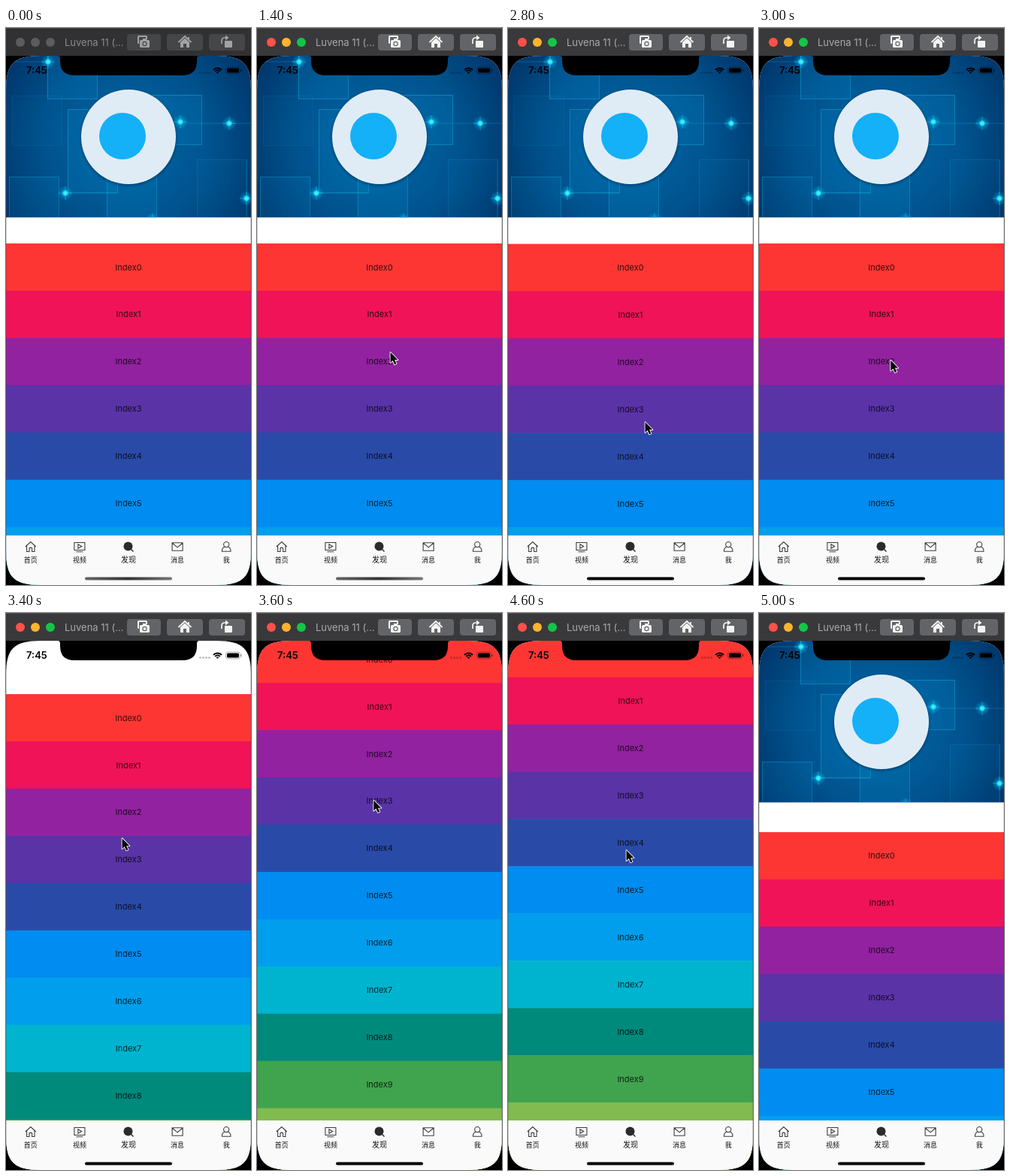
An HTML page with a canvas for the animation above (5.2 s loop, 326 by 742 pixels).

```html
<!DOCTYPE html>
<html lang="zh">
<head>
<meta charset="utf-8">
<title>Scrolling list</title>
<style>
html, body { margin: 0; width: 100%; height: 100%; overflow: hidden; background: #000; }
canvas { display: block; width: 326px; height: 742px; }
</style>
</head>
<body>
<canvas id="stage"></canvas>
<script>
const W = 326, H = 742, LOOP = 5200, STEP = 200;
const TOP = 37, ROW = 62.95, REST = 287, TAB_Y = 676, BANNER_H = 215.6;
const COLORS = ['#fd3633', '#f01358', '#9222a0', '#5a33a6', '#2a4aa8', '#008cf0', '#009eec',
  '#00b4cf', '#008a7c', '#40a44e', '#82bb50', '#cdd648', '#ffe23a'];

const canvas = document.getElementById('stage');
const dpr = window.devicePixelRatio || 1;
canvas.width = W * dpr;
canvas.height = H * dpr;
const c = canvas.getContext('2d');
c.scale(dpr, dpr);

const clamp = v => Math.max(0, Math.min(1, v));
const part = (t, a, b) => clamp((t - a) / (b - a));
const easeOut = (t, a, b) => Math.sin(part(t, a, b) * Math.PI / 2);
const hump = (t, a, b) => Math.sin(part(t, a, b) * Math.PI);
function ramp(t, a, b) {
  const u = part(t, a, b);
  return u * u * (3 - 2 * u);
}

// Top of the first row: short drag, overscroll and release, long swipe up and back.
function listTop(t) {
  return REST - 137 * hump(t, 400, 1200)
    + 67 * (ramp(t, 1400, 2200) - ramp(t, 2300, 2830))
    - 408 * (easeOut(t, 3000, 4384) - ramp(t, 4400, 4900))
    + 8 * hump(t, 4700, 5080);
}

function pointerAt(t) {
  return [
    177 + 5 * ramp(t, 1400, 2800) - 28 * ramp(t, 2800, 3400) + 3 * ramp(t, 3400, 4000),
    431 - 137 * hump(t, 400, 1200) + 137 * ramp(t, 1400, 2200) - 44 * ramp(t, 2300, 2800)
      - 318 * easeOut(t, 2800, 4000) + 310 * ramp(t, 4400, 4900)
  ];
}

function rect(x, y, w, h, color) {
  c.fillStyle = color;
  c.fillRect(x, y, w, h);
}

function round(x, y, w, h, r, color) {
  c.beginPath();
  c.roundRect(x, y, w, h, r);
  c.fillStyle = color;
  c.fill();
}

function disc(x, y, r, color) {
  c.beginPath();
  c.arc(x, y, r, 0, 7);
  c.fillStyle = color;
  c.fill();
}

function path(d, color, width) {
  const p = new Path2D(d);
  if (width) {
    c.strokeStyle = color;
    c.lineWidth = width;
    c.stroke(p);
  } else {
    c.fillStyle = color;
    c.fill(p);
  }
}

function text(s, x, y, font, color, align = 'center') {
  c.font = font;
  c.fillStyle = color;
  c.textAlign = align;
  c.fillText(s, x, y);
}

function place(x, y, draw) {
  c.save();
  c.translate(x, y);
  draw();
  c.restore();
}

function titleBar(active) {
  rect(0, 0, W, TOP, active ? '#39393b' : '#313133');
  rect(0, 0, W, 1, active ? '#525254' : '#414143');
  ['#ff5049', '#fdb42f', '#12c648'].forEach((color, i) =>
    disc(19 + i * 20, 19, 6, active ? color : '#5c5c5f'));
  text('Luvena 11 (...', 78, 24, '13px Inter, sans-serif', active ? '#a9a9ae' : '#8b8b8f', 'left');

  const face = active ? '#636467' : '#454648';
  const ink = active ? '#f4f4f4' : '#a2a2a4';
  round(161, 8, 45, 22, 4, face);
  round(214, 8, 48, 22, 4, face);
  round(270, 8, 48, 22, 4, face);
  place(183, 19, () => {
    round(-8, -9, 13, 11, 1.5, ink);
    rect(-6, -7, 9, 7, face);
    round(-6, -4, 15, 12, 2, face);
    round(-5, -3, 13, 10, 1.5, ink);
    rect(-1, -5, 5, 3, ink);
    disc(1.5, 2, 3.2, face);
    disc(1.5, 2, 2, ink);
  });
  place(238, 19, () => {
    path('M-8.5 0L0-8L8.5 0M5-7V-3', ink, 1.8);
    path('M-6 0L0-5.5L6 0V7H2V2H-2V7H-6Z', ink);
  });
  place(294, 19, () => {
    round(-3, -2, 10, 9, 1, ink);
    path('M-7 2V-2Q-7-6-3-6H-1', ink, 1.7);
    path('M-2-9.5L2.5-6L-2-2.5Z', ink);
  });
}

function glow(x, y) {
  const g = c.createRadialGradient(x, y, 0, x, y, 10);
  g.addColorStop(0, '#7dfaff');
  g.addColorStop(0.28, '#16dcf2');
  g.addColorStop(0.45, 'rgba(0,190,240,.4)');
  g.addColorStop(1, 'rgba(0,170,240,0)');
  disc(x, y, 10, g);
  path(`M${x - 9} ${y}h18M${x} ${y - 9}v18`, 'rgba(60,225,250,.4)', 1);
}

function panel(x, y, h, strength) {
  rect(x, y, 66, h, `rgba(0,160,225,${strength * 0.3})`);
  c.strokeStyle = `rgba(20,180,225,${strength})`;
  c.lineWidth = 1;
  c.strokeRect(x + 0.5, y + 0.5, 66, h);
}

function banner() {
  c.beginPath();
  c.rect(0, TOP, W, BANNER_H);
  c.clip();
  const g = c.createRadialGradient(163, 155, 20, 163, 150, 205);
  g.addColorStop(0, '#0064a3');
  g.addColorStop(0.5, '#00528d');
  g.addColorStop(1, '#003064');
  rect(0, TOP, W, BANNER_H, g);

  panel(55, 28, 66, 0.45);
  panel(82, 108, 111, 0.4);
  panel(194, 89, 66, 0.45);
  panel(4, 198, 66, 0.35);
  panel(134, 192, 66, 0.4);
  panel(254, 175, 80, 0.15);
  panel(8, 90, 66, 0.1);
  path('M0 45H56M226 127H326M79 220H148M320 175V252', 'rgba(20,180,225,.3)', 1);
  glow(56, 45);
  glow(232, 125);
  glow(297, 127);
  glow(79, 220);
  glow(320, 227);
  glow(195, 256);

  c.shadowColor = 'rgba(0,25,60,.6)';
  c.shadowBlur = 4 * dpr;
  c.shadowOffsetY = 1.5 * dpr;
  disc(163, 145, 63, '#e0ecf5');
  c.shadowColor = 'transparent';
  disc(155, 144, 31, '#14b0f8');
}

// The banner scrolls at a quarter of the list speed and fades near the end.
function header(top) {
  const range = REST - TOP - 79;
  const t = clamp((REST - top) / range);
  const alpha = clamp((1 - t) / 0.26);
  if (!alpha) return;
  c.save();
  c.beginPath();
  c.rect(0, TOP, W, top - TOP);
  c.clip();
  c.globalAlpha = alpha;
  c.translate(0, -range / 4 * t);
  banner();
  c.restore();
}

function list(top) {
  COLORS.forEach((color, i) => {
    const y = top + i * ROW;
    rect(0, y, W, ROW + 0.5, color);
    text('Index' + i, 163, y + 35.5, '11px Inter, sans-serif', 'rgba(0,0,0,.78)');
  });
}

function statusBar() {
  text('7:45', 27, 61, '600 13px Inter, sans-serif', '#000', 'left');
  for (let i = 0; i < 4; i++) disc(258.5 + i * 4, 59.5, 1.5, 'rgba(0,0,0,.24)');
  for (let r = 1.5; r < 8; r += 3) {
    c.beginPath();
    c.arc(281.5, 61, r, -Math.PI * 0.76, -Math.PI * 0.24);
    c.strokeStyle = '#000';
    c.lineWidth = 2;
    c.stroke();
  }
  c.beginPath();
  c.roundRect(292.5, 52, 19, 9, 2.8);
  c.strokeStyle = 'rgba(0,0,0,.4)';
  c.lineWidth = 0.8;
  c.stroke();
  round(294, 53.4, 16, 6.2, 1.6, '#000');
  round(312.5, 55, 1.2, 3, 0.6, 'rgba(0,0,0,.45)');
}

const INK = '#3c3c3c';
const TABS = [
  ['首页', () => path('M-7 0L0-6.5L7 0M-5.2-1.5V6.5H-1.8V2Q0 .2 1.8 2V6.5H5.2V-1.5', INK, 1.1)],
  ['视频', () => path('M-7-5.5H7V4.5H-7ZM-4.5 6.8H4.5M-2-3.3L2.8-.5L-2 2.3Z', INK, 1.1)],
  ['发现', () => {
    disc(-0.5, -0.5, 6, '#2b2b2d');
    path('M3 3L6.5 6.5', '#2b2b2d', 1.4);
  }],
  ['消息', () => path('M-7-5.3H7V5.3H-7ZM-7-5L0 .8L7-5', INK, 1.1)],
  ['我', () => path('M0-6.5A3.6 3.6 0 0 1 0 .7A3.6 3.6 0 0 1 0-6.5ZM-2.4 0Q-6 1.8-5.8 6.3H5.8Q6 1.8 2.4 0', INK, 1.1)]
];

function tabBar(t) {
  rect(0, TAB_Y, W, H - TAB_Y, '#fafafa');
  TABS.forEach(([label, icon], i) => {
    const x = 32.8 + i * 65.1;
    place(x, 691, icon);
    const size = i === 2 ? 10 : 9;
    text(label, x, 712.3, size + 'px "Noto Sans CJK SC", "Noto Sans CJK", sans-serif', '#111');
  });
  let ink = '#000';
  if (t < 1600) {
    ink = c.createLinearGradient(105, 0, 221, 0);
    ink.addColorStop(0, '#666');
    ink.addColorStop(0.5, '#333');
    ink.addColorStop(1, '#777');
  }
  round(105, 731.5, 116, 4, 2, ink);
}

// Smooth corners: wider and softer than circular arcs.
function clipScreen() {
  const reach = 46, pull = 10.4;
  c.beginPath();
  [[0, TOP, 1, 1], [W, TOP, -1, 1], [W, H, -1, -1], [0, H, 1, -1]].forEach(([x, y, sx, sy], i) => {
    const across = d => [x + sx * d, y], down = d => [x, y + sy * d];
    const [from, to] = i % 2 ? [across, down] : [down, across];
    c.lineTo(...from(reach));
    c.bezierCurveTo(...from(pull), ...to(pull), ...to(reach));
  });
  c.clip();
}

function pointer(x, y) {
  place(x - 0.5, y, () => {
    c.lineJoin = 'round';
    const d = 'M1 1V15L4.2 12L6.6 17.3L9 16.2L6.7 11.1H11Z';
    path(d, '#fff', 1.7);
    path(d, '#0a0a0a');
  });
}

function draw(t) {
  const top = listTop(t);
  rect(0, 0, W, H, '#000');
  c.save();
  clipScreen();
  rect(0, TOP, W, H - TOP, '#fff');
  header(top);
  list(top);
  statusBar();
  tabBar(t);
  rect(0, TOP, 0.6, H, 'rgba(70,70,70,.45)');
  rect(W - 0.6, TOP, 0.6, H, 'rgba(70,70,70,.45)');
  c.restore();
  path('M69 37Q72 37 72 41V44Q72 63 91 63H235Q254 63 254 44V41Q254 37 257 37Z', '#000');
  titleBar(t >= 400);
  if (t >= 400 && t < 4800) pointer(...pointerAt(t));
}

const start = performance.now();
function tick() {
  const t = (performance.now() - start) % LOOP;
  draw(Math.floor(t / STEP) * STEP);
  requestAnimationFrame(tick);
}
tick();
</script>
</body>
</html>
```
